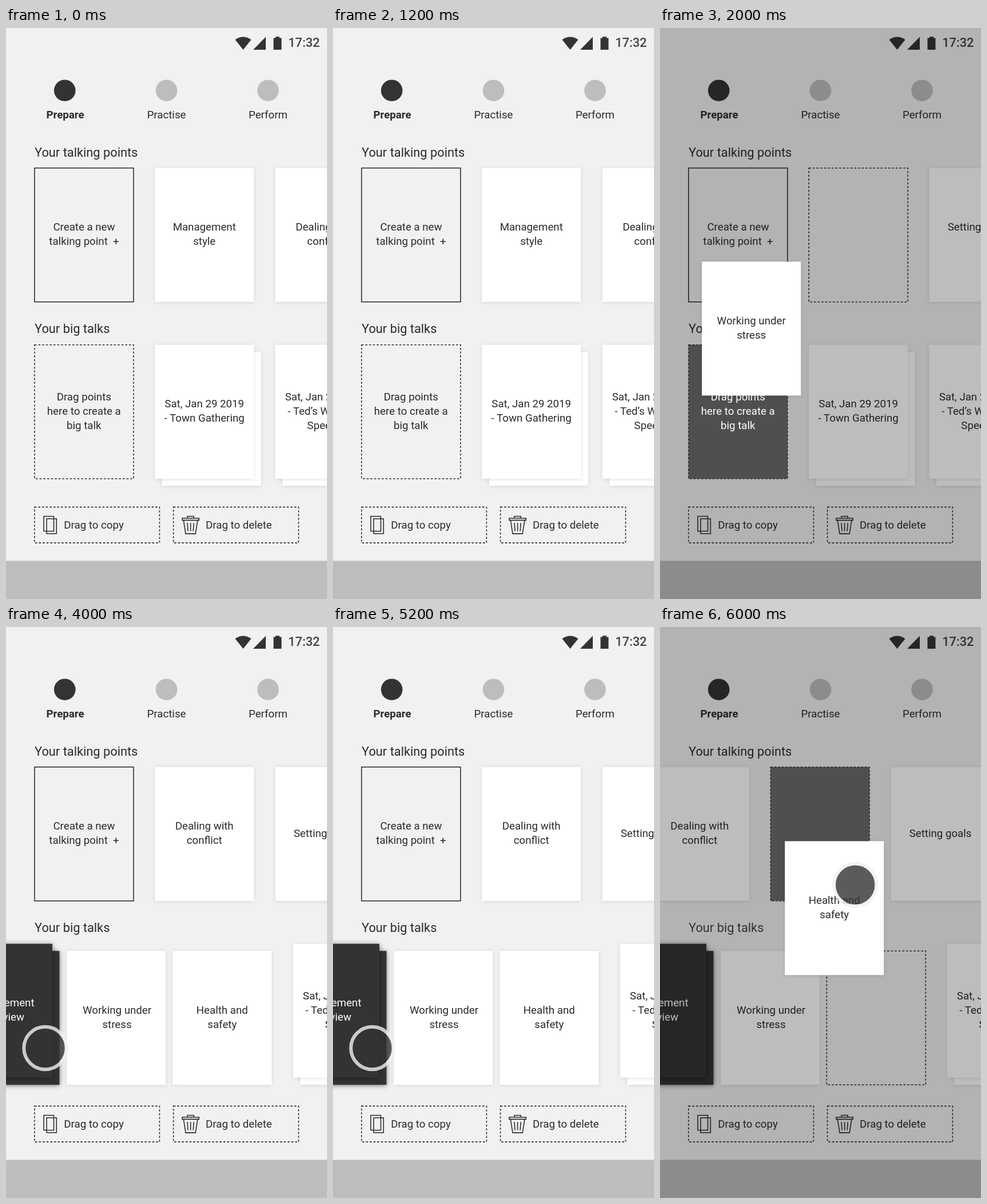
Recreate the animation shown at these times as an HTML page. Size 561x998 px, loop 8 s.

```html
<!DOCTYPE html>
<html lang="en">
<head>
<meta charset="utf-8">
<title>Talk planner</title>
<style>
  html, body { margin: 0; width: 100%; height: 100%; overflow: hidden; background: #f1f1f1; }
  svg { display: block; width: 100vw; height: 100vh; }
  text { font: 18.7px Roboto, sans-serif; fill: #2b2b2b; text-anchor: middle; }
  .head { font-size: 21.8px; text-anchor: start; }
  .left { text-anchor: start; }
  .bold { font-weight: 700; }
  .clock { font-size: 21.8px; font-weight: 500; fill: #424242; }
  .light text { fill: #fff; }
  .soft { fill: #444; }
  .card { fill: #fff; filter: drop-shadow(0 1px 3px rgba(0, 0, 0, .12)); }
  .dark { fill: #333; filter: drop-shadow(0 1px 4px rgba(0, 0, 0, .5)); }
  .line { fill: none; stroke: #2b2b2b; stroke-width: 1.56; }
  .dash { stroke-dasharray: 3.6 3; }
  .target { fill: #4f4f4f; }
  .dim { fill: #000; opacity: .26; }
  .touch { opacity: .8; }
  .scene { visibility: hidden; animation: show 8s step-end infinite; }
  @keyframes show {
    0% { visibility: visible; }
    25%, 100% { visibility: hidden; }
  }
</style>
</head>
<body>
<svg id="stage" viewBox="0 0 561 998" preserveAspectRatio="none"></svg>
<script>
  const W = 173, H = 234, LINE = 25;
  const TOP = 244.7, LOW = 553.7, STEP = 12.5;
  const COL = [49.9, 260.2, 470.6];

  const rect = (x, y, cls, w = W, h = H) =>
    `<rect x="${x}" y="${y}" width="${w}" height="${h}" class="${cls}"/>`;
  const text = (x, y, str, cls = '') => `<text x="${x}" y="${y}" class="${cls}">${str}</text>`;

  // Lines are centred vertically on a card whose top is y
  const label = (cx, y, ...lines) => lines
    .map((s, i) => text(cx, y + 121.8 + (i - (lines.length - 1) / 2) * LINE, s)).join('');
  const card = (x, y, ...lines) => rect(x, y, 'card') + label(x + W / 2, y, ...lines);
  const stack = (x, ...lines) => rect(x + STEP, LOW + STEP, 'card') + card(x, LOW, ...lines);
  const slot = (x, y, cls = '') => rect(x, y, 'line dash ' + cls);
  const light = s => `<g class="light">${s}</g>`;
  const dim = rect(0, 0, 'dim', 561, 998);
  const touch = (x, y) => `<g class="touch"><circle cx="${x}" cy="${y}" r="37.2"
    fill="#333" stroke="#f1f1f1" stroke-width="6"/></g>`;

  const drag = ['Drag points', 'here to create a', 'big talk'];
  const stress = ['Working under', 'stress'];
  const health = ['Health and', 'safety'];
  const conflict = ['Dealing with', 'conflict'];
  const create = rect(COL[0], TOP, 'line') +
    label(136.5, TOP, 'Create a new', 'talking point\u00a0 +');
  const talksHead = (cls = '') => text(50, 533, 'Your big talks', 'head ' + cls);
  const meetup = stack(COL[1], 'Sat, Jan 29 2019', '- Town Gathering');
  const wedding = x => stack(x, 'Sat, Jan 29 2019', '- Ted’s Wedding', 'Speech');
  const review = rect(-79.5, LOW + STEP, 'dark') + rect(-92, LOW, 'dark') +
    light(label(-5.5, LOW, 'Management', 'interview'));

  const tab = (cx, name, on) =>
    `<circle cx="${cx}" cy="109.2" r="18.8" fill="${on ? '#333' : '#bdbdbd'}"/>` +
    text(on ? cx + .8 : cx, 157.6, name, on ? 'bold' : '');

  const base = rect(0, 0, '" fill="#f1f1f1', 561, 998) +
    `<g fill="#333">
      <path d="M400.5 20.4Q414.5 10.4 428.5 20.4L414.5 38Z"/>
      <path d="M432 38H454V15.6Z"/>
      <path d="M471 15.2h7v2.3h3.5V38h-14V17.500h3.500Z"/>
    </g>` +
    text(520.8, 33, '17:32', 'clock') +
    tab(102.7, 'Prepare', true) + tab(280.5, 'Practise') + tab(458, 'Perform') +
    text(50, 224.5, 'Your talking points', 'head') +
    rect(49.8, 837.4, 'line dash', 218.6, 62.5) + rect(292.6, 837.4, 'line dash', 218.8, 62.5) +
    text(101.3, 875, 'Drag to copy', 'left') + text(349, 875, 'Drag to delete', 'left') +
    `<g class="line">
      <path d="M66 853.500h17.500v26H66ZM71 857.800h17.300v26H71Z"/>
      <path d="M308 856.800h29.200v3.600H308ZM317 856.800v-3.300h11.200v3.300
        M310.300 860.400l3.700 23.500h17.200l3.700-23.500M317 865l1 14.500M322.600 865v14.500M328.200 865l-1 14.500"/>
    </g>` +
    rect(0, 931.3, '" fill="#bdbdbd', 561, 67);

  const scenes = [
    create + card(COL[1], TOP, 'Management', 'style') + card(COL[2], TOP, ...conflict) +
      talksHead() + slot(COL[0], LOW) + label(136.3, LOW, ...drag) + meetup + wedding(COL[2]),

    create + slot(COL[1], TOP) + card(COL[2], TOP, 'Setting goals', '') +
      talksHead() + meetup + wedding(COL[2]) + dim +
      slot(COL[0], LOW, 'target') + light(label(136.3, LOW, ...drag)) +
      card(73.2, 408.4, ...stress),

    create + card(COL[1], TOP, ...conflict) + card(COL[2], TOP, 'Setting goals') +
      talksHead() + review + rect(106.2, LOW + STEP, 'card') + label(194, LOW + STEP, ...stress) +
      card(291.3, LOW + STEP, ...health) + wedding(501.7) + touch(68.5, 736),

    card(-17.2, TOP, ...conflict) + card(403.6, TOP, 'Setting goals') + talksHead('soft') +
      review + rect(106.2, LOW + STEP, 'card') + label(194, LOW + STEP, ...stress) +
      slot(291.3, LOW + STEP) + wedding(501.7) + dim +
      slot(193.2, TOP, 'target') + card(218.2, 374.3, ...health) + touch(341.2, 450.8)
  ];

  document.getElementById('stage').innerHTML = base + scenes.map((s, i) =>
    `<g class="scene" style="animation-delay:${i * 2 - 8}s">${s}</g>`).join('');
</script>
</body>
</html>
```
